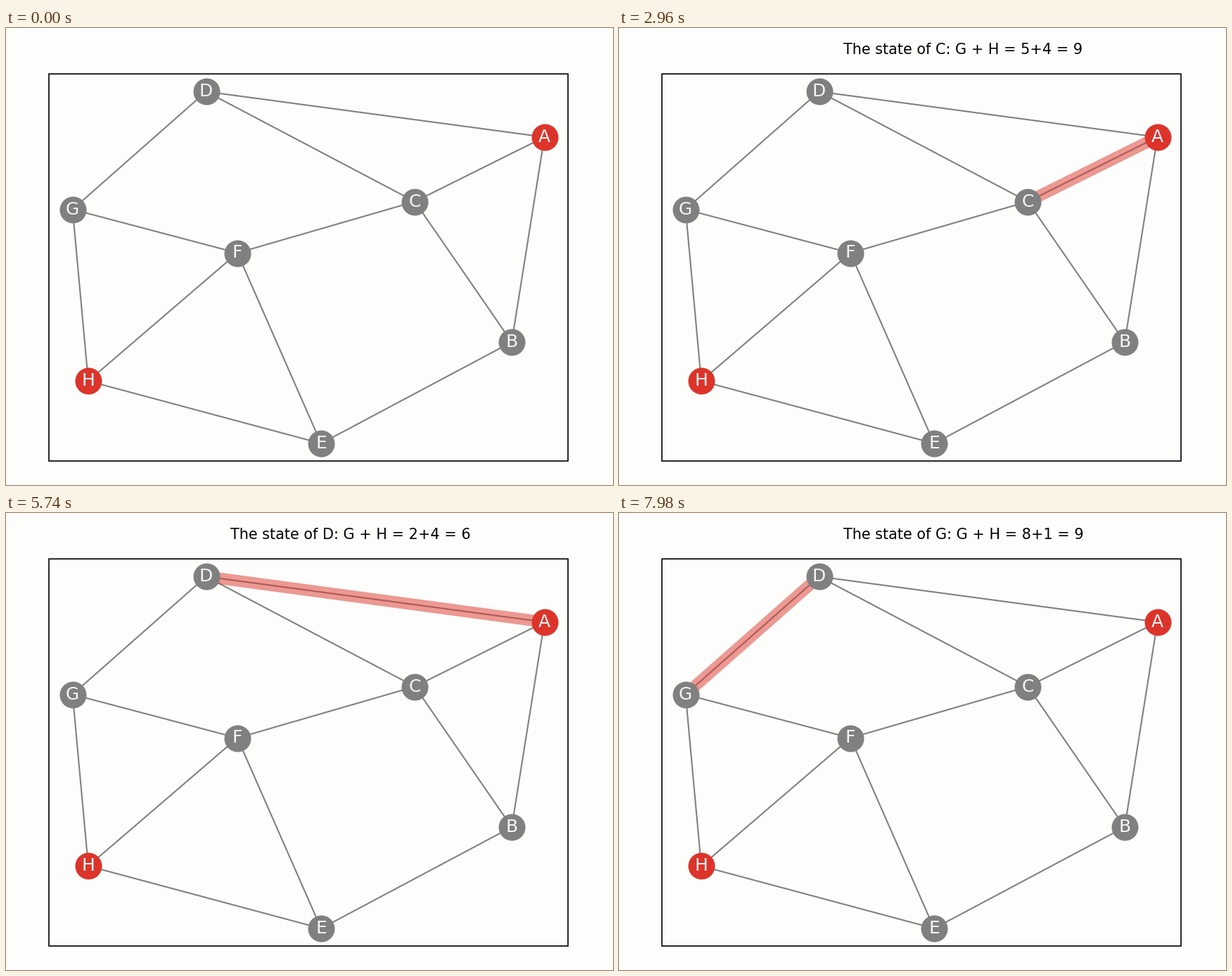
Recreate the animation shown at these times as a matplotlib script. Size 863x649 px, loop 8 s.

```python
import matplotlib.pyplot as plt
from matplotlib.animation import FuncAnimation
from matplotlib.patches import Rectangle

W, H, DPI = 863, 649, 128
LOOP, STEP = 8000, 100
PAPER, GRAY, RED = "#fdfdfc", "#808080", "#dc342b"
PT = 149.3 / DPI  # point scale of the drawing

NODES = {
    "A": (765.5, 154.9), "B": (719, 446), "C": (581.3, 246.5), "D": (284.5, 90.3),
    "E": (448, 590), "F": (329, 319.5), "G": (94.6, 257.6), "H": (117, 501.3),
}
EDGES = "AB AC AD BC BE CD CF DG EF EH FG FH GH".split()
ENDS = "AH"

# start time in ms, highlighted edge, caption
STAGES = [
    (0, None, ""),
    (400, "AB", "The state of B: G + H = 3+4 = 7"),
    (1900, "AC", "The state of C: G + H = 5+4 = 9"),
    (3400, "AD", "The state of D: G + H = 2+4 = 6"),
    (6400, "DC", "update C state: G + H = 2+4 = 6"),
    (7900, "DG", "The state of G: G + H = 8+1 = 9"),
]

plt.rcParams["font.family"] = "DejaVu Sans"
fig = plt.figure(figsize=(W / DPI, H / DPI), dpi=DPI, facecolor=PAPER)
ax = fig.add_axes([0, 0, 1, 1])
ax.set_xlim(0, W)
ax.set_ylim(H, 0)
ax.axis("off")


def ends(edge):
    """Return the x and y coordinates of an edge's two nodes."""
    return zip(*(NODES[name] for name in edge))


ax.add_patch(Rectangle((61, 65.2), 738, 549.7, fill=False, ec="black",
                       lw=0.8 * PT, snap=False))

for edge in EDGES:
    ax.plot(*ends(edge), color=GRAY, lw=PT, zorder=2)

for name, (x, y) in NODES.items():
    color = RED if name in ENDS else GRAY
    ax.plot(x, y, "o", ms=300 ** 0.5 * PT, mew=PT, color=color,
            snap=False, zorder=4)
    ax.text(x, y, name, size=12 * PT, color="whitesmoke",
            ha="center", va="center", zorder=5)

glow, = ax.plot([], [], color=RED, alpha=0.5, lw=8 * PT,
                solid_capstyle="butt", zorder=3)
caption = ax.text(319.4, 37, "", size=10 * PT, color="black", va="baseline")


def update(frame):
    now = frame * STEP
    _, edge, words = [s for s in STAGES if s[0] <= now][-1]
    glow.set_data(*(ends(edge) if edge else ([], [])))
    caption.set_text(words)
    return glow, caption


def reset():
    return update(0)


anim = FuncAnimation(fig, update, frames=LOOP // STEP, init_func=reset,
                     interval=STEP, repeat=True, repeat_delay=0)
plt.show()
```
